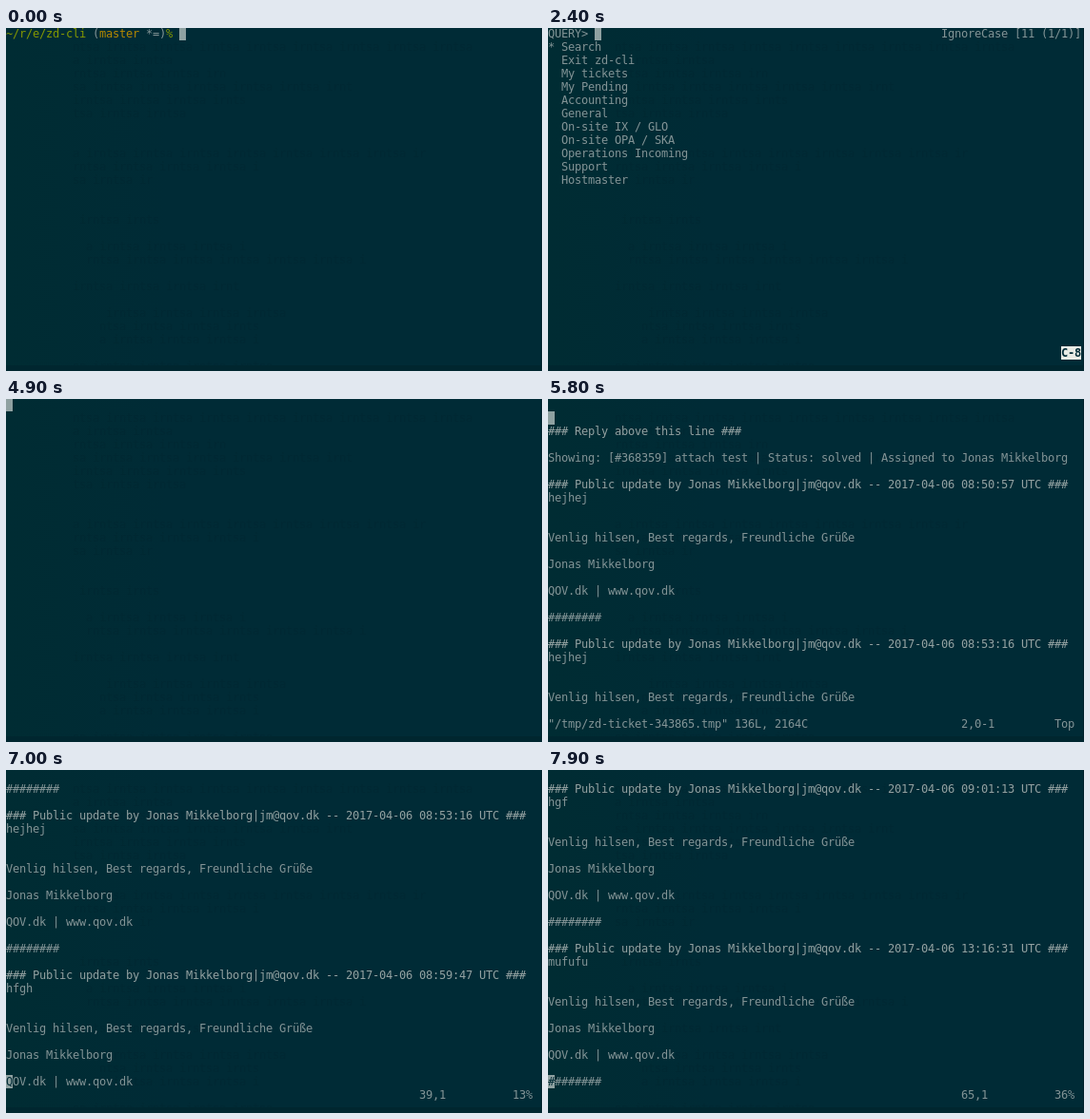
These frames come from a looping animation (563 by 361 pixels, 8 s). An HTML page:

```html
<!DOCTYPE html>
<html lang="en">
<head>
<meta charset="utf-8">
<title>Terminal session</title>
<style>
html, body { margin: 0; width: 100%; height: 100%; overflow: hidden; background: #002b36; }
#stage {
  position: relative; width: 563px; height: 361px; overflow: hidden;
  background: linear-gradient(90deg, #002c33, #002b36 30%);
}
#stage::after {
  content: ""; position: absolute; inset: 0; box-sizing: border-box;
  border-right: 1px solid #00202a; border-bottom: 6px solid #00262f;
}
pre {
  position: absolute; left: 0; top: -1px; margin: 0; color: #839496;
  font: 12px/14px "DejaVu Sans Mono", monospace; letter-spacing: calc(7px - 1ch);
}
#ghost { color: #00222c; opacity: .22; filter: blur(.7px); }
.at { position: absolute; height: 14px; white-space: pre; }
.cursor { width: 7px; background: #8fa1a1; color: #002b36; }
.key { background: #e9ebe5; color: #002b36; font-weight: bold; }
.path { color: #859900; }
.branch { color: #b58900; }
.match { color: #2aa198; }
.head { color: #93a1a1; }
</style>
</head>
<body>
<div id="stage"><pre id="ghost"></pre><pre id="term"></pre></div>
<script>
const LOOP = 8000, STEP = 100, COLS = 80, ROWS = 24, FILE_LINES = 136;
const term = document.getElementById('term');

const at = (col, row, html, cls = '') =>
  `<span class="at ${cls}" style="left:${col * 7}px;top:${row * 14}px">${html}</span>`;
const cursor = (col, row, ch = ' ') => at(col, row, ch, 'cursor');
const span = (cls, text) => `<span class="${cls}">${text}</span>`;
const typed = (text, t, start) => text.slice(0, Math.max(0, Math.floor((t - start) / STEP) + 1));

function prompt(t) {
  const command = typed('./zd-cli', t, 100);
  return at(0, 0, span('path', '~/r/e/zd-cli') + ' (' + span('branch', 'master') + ' *=)' +
    span('path', '%') + ' ' + command) + cursor(26 + command.length, 0);
}

function picker(items, query, key = '', selected = 0) {
  const shown = items.filter(s => s.toLowerCase().includes(query));
  const info = `IgnoreCase [${shown.length} (1/1)]`;
  const mark = s => query ? s.replace(new RegExp(query, 'i'), m => span('match', m)) : s;
  return at(0, 0, 'QUERY> ' + query) + cursor(7 + query.length, 0) +
    at(COLS - info.length, 0, info) +
    shown.map((s, i) => at(0, i + 1, (i === selected ? '* ' : '  ') + mark(s))).join('') +
    (key && at(COLS - key.length, 24, key, 'key'));
}

const menu = ['Search', 'Exit zd-cli', 'My tickets', 'My Pending', 'Accounting', 'General',
  'On-site IX / GLO', 'On-site OPA / SKA', 'Operations Incoming', 'Support', 'Hostmaster'];
const ticket = (id, subject, from, to) =>
  `${id}  ${subject.padEnd(27)}${from.padEnd(15)}1970-01-01  ${to}`;
const tickets = [
  ticket(343865, 'jeg er dum, hjælp!', '1bror@tavs.dk', '-'),
  ticket(343854, 'jeg er også dum, hjææælp!', 'bror@tavs.dk', 'rbt@qov.dk')
];

function menuScene(t) {
  const word = 'accoun';
  const erased = Math.max(0, Math.floor((t - 1900) / STEP) + 1);
  const query = typed(word, t, 1200).slice(0, Math.max(0, word.length - erased));
  return picker(menu, query, erased ? 'C-8' : query.slice(-1));
}

function ticketScene(t) {
  const query = t < 3200 ? '' : t < 3400 ? 'd' : t < 4000 ? 'du' : 'dum';
  const down = t >= 3500 && t < 3700;
  const key = t >= 4800 ? '' : down ? 'C-n' : t >= 3700 && t < 4000 ? 'C-p' : query.slice(-1);
  return picker(tickets, query, key, down ? 1 : 0);
}

// The ticket file: a short header, then updates of twelve lines each.
const author = 'Jonas Mikkelborg';
const updates = [['08:50:57', 'hejhej'], ['08:53:16', 'hejhej'], ['08:59:47', 'hfgh'],
  ['09:01:13', 'hgf'], ['13:16:31', 'mufufu']];
const file = ['', '', '### Reply above this line ###', '',
  `Showing: [#368359] attach test | Status: solved | Assigned to ${author}`, '',
  ...updates.flatMap(([time, body]) => [
    `### Public update by ${author}|jm@qov.dk -- 2017-04-06 ${time} UTC ###`, body, '', '',
    'Venlig hilsen, Best regards, Freundliche Grüße', '', author, '',
    'QOV.dk | www.qov.dk', '', '########', ''])];

// Time and cursor line; the line runs evenly between these points.
const moves = [[5400, 1], [5700, 1], [5800, 2], [6700, 32], [7300, 46], [7900, 65], [8000, 65]];

function lineAt(t) {
  const i = moves.findIndex(([end]) => t < end);
  const [t0, a] = moves[i - 1], [t1, b] = moves[i];
  return Math.round(a + (b - a) * (t - t0) / (t1 - t0));
}

function editor(t) {
  const line = lineAt(t), top = Math.max(0, line - ROWS), text = file[line - 1];
  const place = top ? Math.floor(top / (FILE_LINES - ROWS) * 100) + '%' : 'Top';
  return file.slice(top, top + ROWS)
      .map((s, i) => at(0, i, s, s.startsWith('### ') ? 'head' : '')).join('') +
    (top ? '' : at(0, 24, `"/tmp/zd-ticket-343865.tmp" ${FILE_LINES}L, 2164C`)) +
    at(62, 24, line + (text ? ',1' : ',0-1')) + at(79 - place.length, 24, place) +
    cursor(0, line - 1 - top, text[0] || ' ');
}

const blank = () => cursor(0, 0);
const scenes = [[0, prompt], [900, blank], [1000, menuScene], [2600, blank],
  [2900, ticketScene], [4900, blank], [5400, editor]];

// Barely visible writing behind the translucent window: column, row, length.
const ghosts = [[10, 1, 60], [10, 2, 16], [10, 3, 23], [10, 4, 42], [10, 5, 26], [10, 6, 18],
  [10, 9, 53], [10, 10, 28], [10, 11, 12], [10, 14, 13], [12, 16, 24], [12, 17, 42],
  [10, 19, 25], [14, 21, 29], [14, 22, 24], [14, 23, 24], [10, 25, 31]];
document.getElementById('ghost').innerHTML = ghosts.map(([col, row, len]) =>
  at(col, row, Array.from({ length: len }, (_, i) =>
    (i + row * 3) % 7 ? 'enarsit'[(i * 5 + row) % 7] : ' ').join(''))).join('');

let last = '';
function draw(now) {
  const t = Math.floor(now % LOOP / STEP) * STEP;
  const html = scenes.findLast(([start]) => t >= start)[1](t);
  if (html !== last) term.innerHTML = last = html;
  requestAnimationFrame(draw);
}
draw(0);
</script>
</body>
</html>
```
